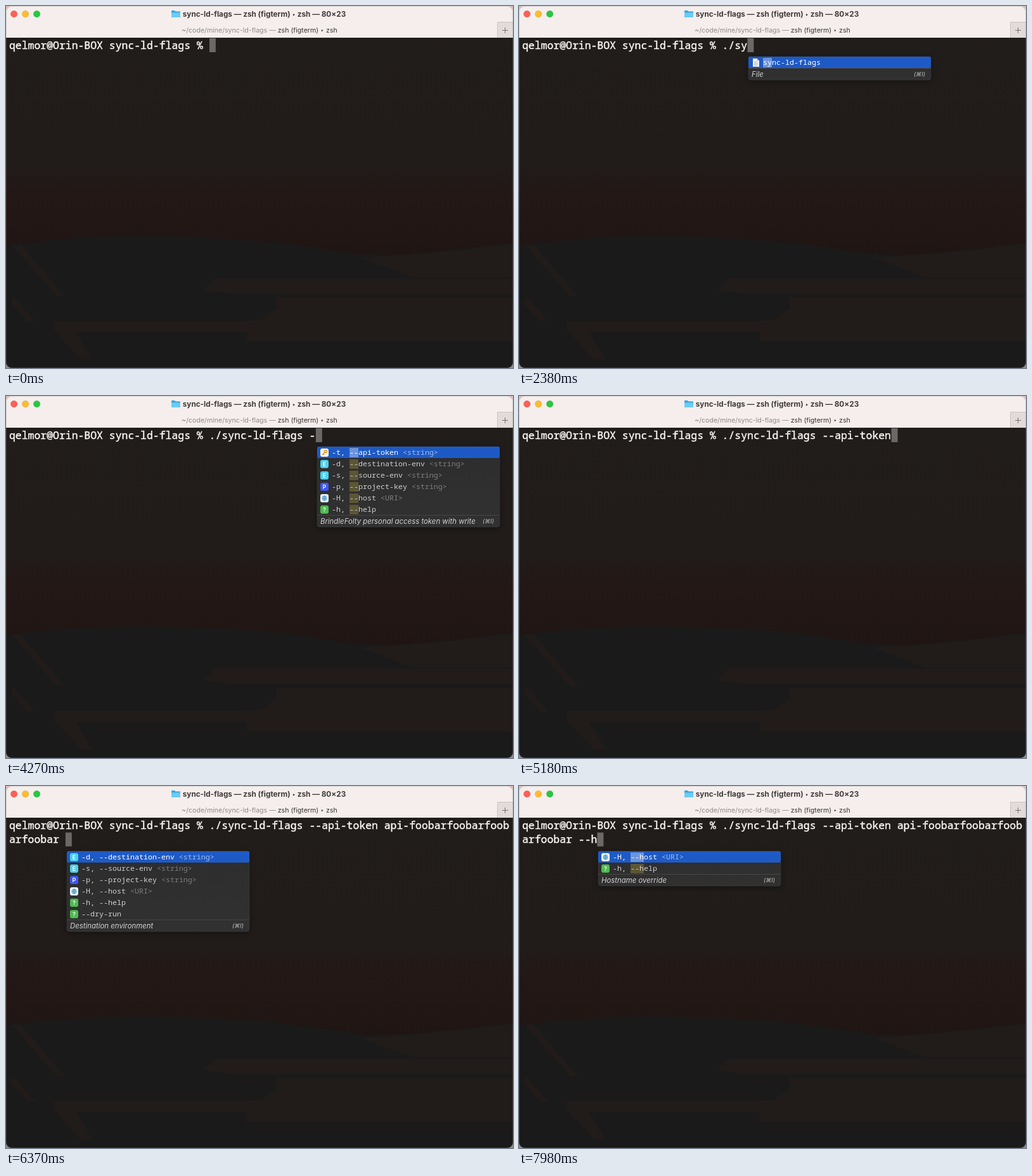
These frames come from a looping animation (800 px wide and 572 px high, 8 s). An HTML page:

```html
<!DOCTYPE html>
<html lang="en">
<head>
<meta charset="utf-8">
<title>Terminal session</title>
<style>
  html, body { margin: 0; width: 100%; height: 100%; overflow: hidden; background: linear-gradient(#d9bdb8, #8d8b8b); }
  svg { display: block; width: 800px; height: 572px; }
  text { white-space: pre; font-variant-ligatures: none; }
  .ui { font-family: Inter, "Open Sans", sans-serif; }
  .term { font: 500 16.46px "Noto Sans Mono", monospace; fill: #f8f5f3; stroke: #f8f5f3; stroke-width: .45px; }
  .row { font: 400 11.667px "Noto Sans Mono", monospace; fill: #cfcfcf; }
  .row.on { font-weight: 500; fill: #fff; }
  .arg { fill: #7d7d7d; font-weight: 400; }
  .on .arg { fill: #9dbbf0; }
  .note { font-size: 11.4px; font-style: italic; fill: #d2d2d2; }
  .hint { font-size: 9px; font-style: italic; fill: #c4c4c4; }
  .badge { font-size: 9px; font-weight: 600; fill: #fff; text-anchor: middle; }
</style>
</head>
<body>
<svg viewBox="0 0 800 572">
  <defs>
    <clipPath id="window"><rect width="800" height="572" rx="9"/></clipPath>
    <linearGradient id="sky" x1="0" y1="0" x2="0" y2="1">
      <stop offset="0" stop-color="#211d1a"/>
      <stop offset=".56" stop-color="#211c1a"/>
      <stop offset=".7" stop-color="#231816"/>
      <stop offset="1" stop-color="#1f1513"/>
    </linearGradient>
    <linearGradient id="panel" x1="0" y1="0" x2="0" y2="1">
      <stop offset="0" stop-color="#2d2d2d"/>
      <stop offset="1" stop-color="#313131"/>
    </linearGradient>
    <symbol id="folder" viewBox="0 0 14 13">
      <path d="M0 2Q0 1 1 1H5L6.5 2.5H13Q14 2.5 14 3.5V11Q14 12 13 12H1Q0 12 0 11Z" fill="#3ba7dc"/>
      <path d="M0 4.5H14V11Q14 12 13 12H1Q0 12 0 11Z" fill="#6bcbf5"/>
    </symbol>
  </defs>
  <g clip-path="url(#window)">
    <rect y="50" width="800" height="350" fill="url(#sky)"/>
    <path d="M0 378C80 368 160 362 240 364S360 368 420 373S540 394 600 393S720 382 800 374V572H0Z" fill="#1b1a1a"/>
    <g fill="#211c1a">
      <path d="M560 398Q680 392 800 376V428H640Z"/>
      <path d="M330 431H800V455H360L312 449Z"/>
      <path d="M425 461H800V530H380V497H400L428 478Z"/>
      <path d="M76 498H380V515H110L136 558H118L76 512Z"/>
      <path d="M10 378H24L92 458H80ZM10 458L46 498H34L8 470Z"/>
    </g>
    <rect width="800" height="50.4" fill="#f5eeec"/>
    <rect y="50.4" width="800" height="1" fill="#0d0b0a"/>
    <g stroke="#000" stroke-opacity=".12" stroke-width=".8">
      <circle cx="12.6" cy="12.6" r="5.3" fill="#fe5f57"/>
      <circle cx="30.6" cy="12.6" r="5.3" fill="#febc2e"/>
      <circle cx="48.6" cy="12.6" r="5.3" fill="#28c840"/>
    </g>
    <use href="#folder" x="261" y="6" width="14" height="13"/>
    <text class="ui" x="407.5" y="16.7" font-size="11.75" font-weight="700" fill="#403b3a" text-anchor="middle">sync-ld-flags — zsh (figterm) ‣ zsh — 80×23</text>
    <text class="ui" x="400" y="41.5" font-size="10.6" fill="#383433" text-anchor="middle"><tspan fill="#918b89">~/code/mine/sync-ld-flags — </tspan>zsh (figterm) ‣ zsh</text>
    <rect x="775" y="25" width="25" height="25" fill="#e2dbd9"/>
    <path d="M775.5 50V25.5H800" fill="none" stroke="#cbc4c2"/>
    <path d="M783 38.5H792M787.5 34V43" stroke="#77716f" fill="none"/>
    <g id="screen"></g>
  </g>
  <rect x=".5" y=".5" width="799" height="571" rx="8.5" fill="none" stroke="#777" stroke-opacity=".25"/>
</svg>
<script>
const LOOP = 8000, COLS = 80, CHAR = 9.875, LINE = 22.5, ROW = 18, WIDTH = 288;
const PROMPT = 'qelmor@Orin-BOX sync-ld-flags % ';
const RUN = './sync-ld-flags ', FLAG = RUN + '--api-token';
const TOKEN = ' api-' + 'foobar'.repeat(4), FULL = FLAG + TOKEN + ' ';

// id: [icon, label, argument, footer note]
const ITEMS = {
  here: ['enter', '↪', '', 'Enter the current directory'],
  docs: ['folder', 'docs/'],
  json: ['ball', 'example-config.json'],
  js: ['script', 'index.js'],
  license: ['page', 'LICENSE.txt'],
  modules: ['folder', 'node_modules/'],
  tool: ['page', 'sync-ld-flags', '', 'File'],
  t: ['key', '-t, --api-token', '<string>', 'BrindleFolty personal access token with write'],
  d: ['E', '-d, --destination-env', '<string>', 'Destination environment'],
  s: ['E', '-s, --source-env', '<string>'],
  p: ['P', '-p, --project-key', '<string>'],
  H: ['globe', '-H, --host', '<URI>', 'Hostname override'],
  h: ['?', '-h, --help'],
  dry: ['?', '--dry-run']
};
const FILES = 'here docs json js license modules';
const FLAGS = 't d s p H h', MORE = 'd s p H h dry';

// [start ms, typed text, popup items, matched text]
const STEPS = [
  [0, ''],
  [70, '.'],
  [210, './'],
  [280, './', FILES],
  [2100, './s', 'tool', 's'],
  [2310, './sy', 'tool', 'sy'],
  [2520, RUN.trim()],
  [2730, RUN, FLAGS],
  [3850, RUN + '-', FLAGS, '--'],
  [4410, RUN + '--', FLAGS, '--'],
  [4620, RUN + '--a', 't', '--a'],
  [4830, FLAG],
  ...[...TOKEN].map((_, i) => [5320 + i * 30, FLAG + TOKEN.slice(0, i + 1)]),
  [6230, FULL, MORE],
  [7000, FULL + '-', MORE, '--'],
  [7280, FULL + '--', MORE, '--'],
  [7630, FULL + '--h', 'H h', '--h']
];

const esc = s => s.replace(/&/g, '&amp;').replace(/</g, '&lt;').replace(/>/g, '&gt;');
const rect = (x, y, w, h, fill, more = '') =>
  `<rect x="${x}" y="${y}" width="${w}" height="${h}" fill="${fill}" ${more}/>`;
const text = (x, y, cls, body, more = '') => `<text x="${x}" y="${y}" class="${cls}" ${more}>${body}</text>`;
const tile = fill => rect(0, 0, 13, 13, fill, 'rx="3"');
const badge = (letter, fill) => tile(fill) + text(6.5, 9.8, 'ui badge', letter);
const page = '<path d="M2 0H8.5L12 3.5V13H2Z" fill="#f1f1f1"/><path d="M8.5 0V3.5H12Z" fill="#bdbdbd"/>';

const ICONS = {
  enter: tile('#d9304f') + '<path d="M4 3.5L9 6.5L4 9.5" fill="none" stroke="#fff" stroke-width="1.3"/>',
  folder: '<use href="#folder" width="13" height="13"/>',
  ball: '<circle cx="7" cy="7" r="4.3" fill="#e2622f"/>',
  script: page + '<circle cx="7" cy="7.5" r="2.8" fill="#d8503f"/>',
  page: page + '<path d="M4 5H9M4 7H10M4 9H10M4 11H9" stroke="#a5a5a5" stroke-width=".7"/>',
  key: tile('#f7f4ea') + '<g fill="none" stroke="#e0a02c" stroke-width="1.7"><circle cx="8.3" cy="4.5" r="2"/><path d="M6.8 6L3 10M4.5 8.5L6 10"/></g>',
  globe: tile('#eef4f8') + '<circle cx="6.5" cy="6.5" r="4.3" fill="#9fd0ee"/><path d="M2.2 6.5H10.8M6.5 2.2V10.8M3.2 4.2H9.8M3.2 8.8H9.8M6.5 2.2Q2.5 6.5 6.5 10.8Q10.5 6.5 6.5 2.2" fill="none" stroke="#4b91bd" stroke-width=".7"/>',
  E: badge('E', '#4dcfee'),
  P: badge('P', '#3d58ee'),
  '?': badge('?', '#4fbb51')
};

function drawRow(id, i, match) {
  const [icon, label, arg] = ITEMS[id];
  const y = i * ROW, on = i === 0, at = match ? label.indexOf(match) : -1;
  const mark = at < 0 ? '' : rect(23 + at * 7, y + 2, match.length * 7, 15, on ? '#6d95de' : '#5d5634');
  const tail = arg ? `<tspan class="arg"> ${esc(arg)}</tspan>` : '';
  return (on ? rect(0, 0, WIDTH, ROW, '#1e5ac6', 'rx="2"') : '') + mark +
    `<g transform="translate(5 ${y + 3})">${ICONS[icon]}</g>` +
    text(23, y + 13.3, on ? 'row on' : 'row', esc(label) + tail);
}

function drawPopup(x, y, ids, match) {
  const list = ids.split(' '), foot = list.length * ROW;
  return `<g transform="translate(${Math.min(x, 800 - WIDTH)} ${y})">` +
    rect(0, 0, WIDTH, foot + 19, 'url(#panel)', 'rx="4" stroke="#3c3c3c" stroke-width=".7" style="filter:drop-shadow(0 2px 4px #0006)"') +
    list.map((id, i) => drawRow(id, i, match)).join('') +
    `<path d="M0 ${foot + .5}H${WIDTH}" stroke="#464646"/>` +
    text(5, foot + 13.7, 'ui note', ITEMS[list[0]][3]) +
    text(279, foot + 13, 'ui hint', '(⌘I)', 'text-anchor="end"') + '</g>';
}

function drawScreen([, typed, ids, match]) {
  const all = PROMPT + typed, row = Math.floor(all.length / COLS);
  const x = 5 + (all.length % COLS) * CHAR, y = 51 + row * LINE;
  const lines = [all.slice(0, COLS), all.slice(COLS)];
  return rect(x, y, CHAR, 22, '#6c6867') +
    lines.map((line, i) => text(5, 67.5 + i * LINE, 'term', esc(line))).join('') +
    (ids ? drawPopup(Math.floor(x + 2.3), Math.round(80 + row * LINE), ids, match) : '');
}

const screen = document.getElementById('screen');
const start = performance.now();
let shown;
function tick() {
  const time = (performance.now() - start) % LOOP;
  const step = STEPS.findLast(s => s[0] <= time);
  if (step !== shown) screen.innerHTML = drawScreen(shown = step);
  requestAnimationFrame(tick);
}
tick();
</script>
</body>
</html>
```
